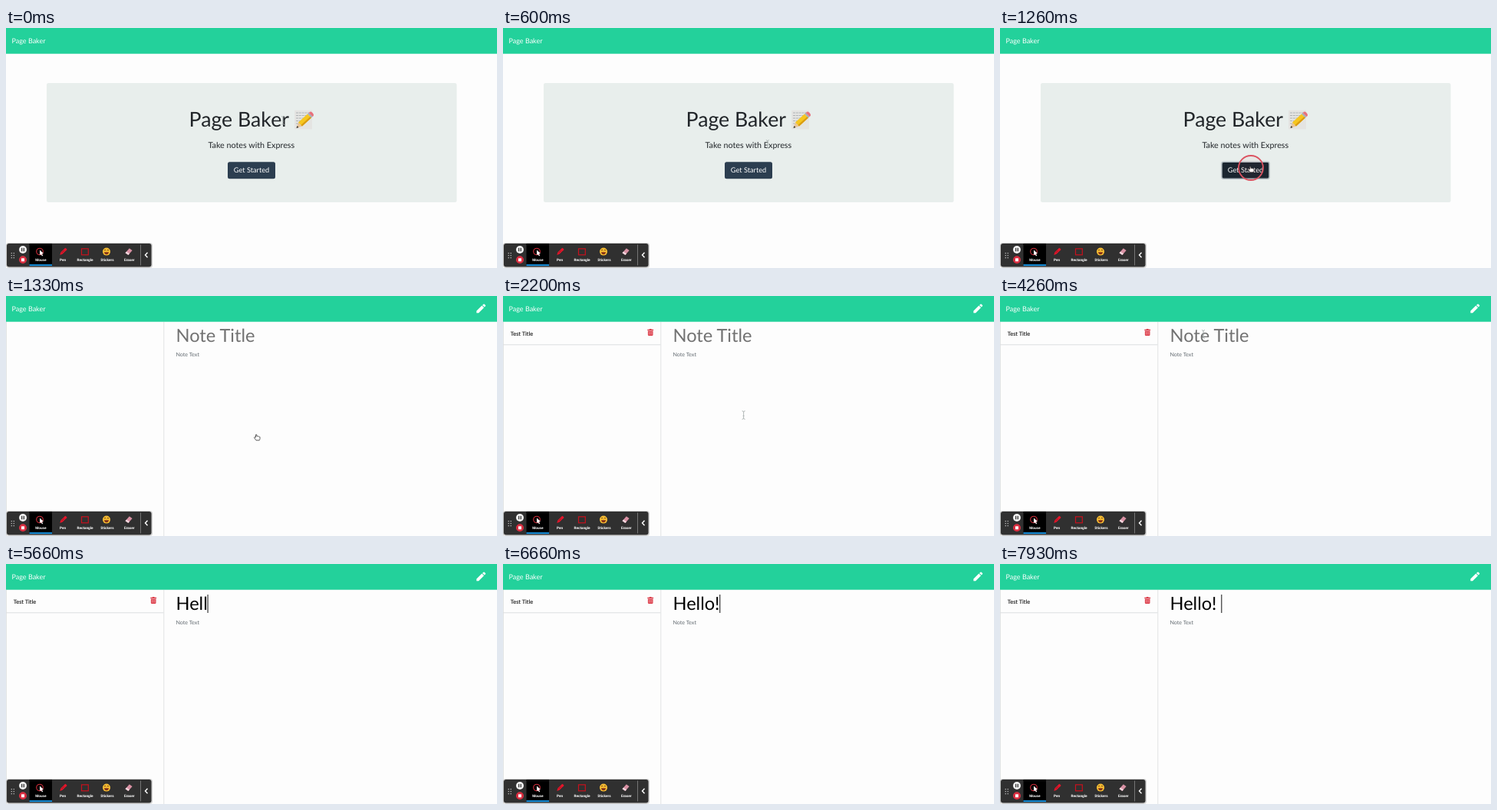
Recreate the animation shown at these times as an HTML page. Size 640x314 px, loop 8 s.

```html
<!DOCTYPE html>
<html lang="en">
<head>
<meta charset="utf-8">
<title>Note app</title>
<style>
html, body { margin: 0; width: 100%; height: 100%; overflow: hidden; background: #fdfdfd; }
svg { display: block; width: 640px; height: 314px; font-family: Lato, sans-serif; text-rendering: geometricPrecision; }
text { white-space: pre; }
.tool text { font: 700 4.7px Roboto, sans-serif; fill: #fff; text-anchor: middle; }
</style>
</head>
<body>
<svg viewBox="0 0 640 314">
  <rect width="640" height="314" fill="#fdfdfd"/>
  <rect width="640" height="33.7" fill="#23d19b"/>
  <text x="7.5" y="20" font-size="9" fill="#fff">Page Baker</text>

  <g id="home">
    <rect x="53" y="72" width="534.5" height="156" rx="2.5" fill="#e8eeec"/>
    <text x="238.6" y="129" font-size="26.7" fill="#212529">Page Baker</text>
    <g id="memo">
      <path d="M376 107.5h23v25h-23z" fill="#e4e4e2"/>
      <path d="M378 111h17m-17 3.5h14m-14 3.5h11m-11 3.5h8m-8 3.5h5" stroke="#a9adb0" stroke-width=".9" stroke-dasharray="3 .8"/>
      <path d="M378.5 131l2.5-7.5 5 5z" fill="#e9c59a"/>
      <path d="M378.5 131l1-3 2 2z" fill="#333"/>
      <path d="M381 123.5L393 112.500l5 5-12 11z" fill="#f6c61f"/>
      <path d="M384.500 127L396.500 116l1.500 1.500-12 11z" fill="#d99b12"/>
      <path d="M393 112.500l1.700-1.600 5 5-1.700 1.600z" fill="#a8b0b5"/>
      <path d="M394.700 110.900l1.300-1.200q1.600-.8 3.600 1.200t1.300 3.800l-1.200 1.200z" fill="#e8707c"/>
    </g>
    <text x="263.500" y="157" font-size="10.750" fill="#212529">Take notes with Express</text>
    <rect id="button" x="289" y="175.200" width="62" height="22" rx="2.500"/>
    <text x="320" y="189.200" font-size="9.200" fill="#fff" text-anchor="middle">Get Started</text>
  </g>

  <g id="notes">
    <path d="M.5 34V314M205.800 34V314" stroke="#dfe1e3" stroke-width=".9"/>
    <g id="item">
      <path d="M0 63.800H205.500" stroke="#dcdee0"/>
      <text x="9.800" y="51.600" font-size="7.400" fill="#111" stroke="#111" stroke-width=".1">Test Title</text>
      <path d="M188.300 43.700h2.200l.6-.8h2.200l.6.8h2.200v1.500h-7.800zM188.900 45.700h6.600v5q0 1.300-1.300 1.300h-4q-1.300 0-1.300-1.300z" fill="#dc3f4c"/>
      <path d="M190.500 46.700v4m1.700-4v4m1.700-4v4" stroke="#f6b5ba" stroke-width=".6"/>
    </g>
    <path d="M613.300 22.300v-2.700l7-7 2.700 2.700-7 7zM621 11.900l1.300-1.200q.7-.6 1.400 0l1.200 1.200q.7.7 0 1.400l-1.200 1.300z" fill="#fff"/>
    <text id="title" x="221.500" y="60.300" font-size="23.600"></text>
    <text x="221.500" y="79.300" font-size="7.150" fill="#626a70">Note Text</text>
    <rect id="caret" y="40" width="1" height="24" fill="#111"/>
  </g>

  <g id="pointer">
    <path id="beam" d="M-2-5.500q2 0 2 2V3.500q0 2-2 2M2-5.500q-2 0-2 2M2 5.500q-2 0-2-2M-1 1h2" fill="none" stroke="#a3aaa9" stroke-width=".8"/>
    <path id="hand" d="M-1.500 0V-3q0-.8.700-.8t.7.8V-1.500q1-.6 1.500.2 1-.5 1.400.4 1.200-.3 1.200.8v1.600q0 1.200-.8 2.300H-1L-3.300.6q-.4-1 .5-1z" fill="#fff" stroke="#333" stroke-width=".8"/>
  </g>
  <circle id="ring" fill="#e04050" fill-opacity=".04" stroke="#dc5260" stroke-width="1.800"/>

  <g class="tool">
    <rect x="0" y="281" width="191" height="33" rx="4" fill="#999" opacity=".45"/>
    <rect x="1" y="282" width="188.500" height="30.500" rx="3" fill="#303030"/>
    <rect x="30.500" y="282" width="29.500" height="29" fill="#000"/>
    <rect x="30.500" y="309.300" width="29.500" height="1.800" fill="#159cf2"/>
    <path d="M7.300 294v8M10.300 294v8" stroke="#bbb" stroke-width="1.300" stroke-dasharray="1.300 1.700"/>
    <circle cx="22" cy="290" r="5" fill="#f4f4f4"/>
    <path d="M20.700 287.800v4.400m2.600-4.400v4.400" stroke="#222" stroke-width="1.200"/>
    <circle cx="22" cy="303.300" r="5" fill="#d92e40"/>
    <rect x="20" y="301.300" width="4" height="4" fill="#fff"/>
    <circle cx="44" cy="292.500" r="4.300" fill="none" stroke="#d52e3c" stroke-width="1.100"/>
    <path d="M44 290.500l5 4.500-2.200.3 1.300 2.500-1.100.6-1.300-2.500-1.700 1.400z" fill="#fff"/>
    <path d="M70.300 297l1-3.500 4.800-4.800 2.300 2.300-4.800 4.800zM75.800 289l1-1q.7-.5 1.400.2l1 1q.5.700-.1 1.200l-1 1z" fill="#e5152a"/>
    <path d="M72.300 294.500l3.500-3.500" stroke="#7d1720" stroke-width=".7"/>
    <rect x="98.500" y="288.800" width="8.800" height="8" fill="none" stroke="#c9111d" stroke-width="1.200"/>
    <circle cx="131" cy="292.600" r="5" fill="#f8bd32"/>
    <path d="M128 291q1.200-1.500 2.200 0m1.600 0q1.200-1.500 2.200 0" fill="none" stroke="#633b12" stroke-width=".9"/>
    <path d="M128 293.300h6q-.4 3-3 3t-3-3z" fill="#823018"/>
    <path d="M155.500 294.300l5.300-6 3.800 2.800-5.200 6z" fill="#d991a4"/>
    <path d="M155.500 294.300l1.600-1.800 3.900 2.800-1.600 1.800z" fill="#f1d9df"/>
    <text x="45.300" y="304.700">Mouse</text>
    <text x="74" y="304.700">Pen</text>
    <text x="103" y="304.700">Rectangle</text>
    <text x="132" y="304.700">Stickers</text>
    <text x="160.800" y="304.700">Eraser</text>
    <path d="M175.500 283.500V310.500" stroke="#888" stroke-width=".8"/>
    <path d="M184.500 293.800l-3 3.200 3 3.200" fill="none" stroke="#fff" stroke-width="1.400"/>
  </g>
</svg>
<script>
const LOOP = 8000;
const el = id => document.getElementById(id);
const set = (id, attrs) => { for (const k in attrs) el(id).setAttribute(k, attrs[k]); };
const show = (id, on) => set(id, { visibility: on ? 'inherit' : 'hidden' });

// time, x, y
const path = [[0, 361, 121], [60, 361, 121], [260, 352, 139], [460, 352, 139], [860, 327, 185],
  [2060, 327, 185], [2530, 265, 50], [LOOP, 265, 50]];

// time, typed text, caret shown
const typing = [[0, '', 0], [2730, '', 1], [3260, '', 0], [3730, '', 1], [4260, '', 0],
  [4530, 'H', 1], [5130, 'H', 0], [5330, 'He', 1], [5460, 'Hel', 1], [5660, 'Hell', 1],
  [6200, 'Hello', 1], [6660, 'Hello!', 1], [6860, 'Hello! ', 1], [7400, 'Hello! ', 0], [7930, 'Hello! ', 1]];

function pointerAt(t) {
  const i = path.findIndex(p => p[0] > t);
  const [t0, x0, y0] = path[i - 1], [t1, x1, y1] = path[i];
  const u = (t - t0) / (t1 - t0), e = u * u * (3 - 2 * u);
  return [x0 + (x1 - x0) * e, y0 + (y1 - y0) * e];
}

function drawRing(t, x, y) {
  const [start, end] = t < 2000 ? [1060, 1330] : [2730, 2930];
  const u = (t - start) / (end - start);
  show('ring', u >= 0 && u < 1);
  set('ring', { cx: x, cy: y - 2, r: 16 * Math.min(1, Math.max(0, .5 + u)) });
}

function draw(t) {
  const home = t < 1330, [x, y] = pointerAt(t);
  show('home', home);
  show('notes', !home);
  show('item', !home && t >= 1460);

  const pressed = home && t >= 1060, hover = home && y > 175;
  set('button', {
    fill: hover ? '#1a252f' : '#2c3e50',
    stroke: pressed ? '#aeb8bd' : 'none', 'stroke-width': 1.5
  });

  const [, text, caret] = typing.findLast(s => s[0] <= t);
  el('title').textContent = text;
  const width = text ? el('title').getComputedTextLength() : 0;
  if (!text) el('title').textContent = 'Note Title';
  set('title', { fill: text ? '#000' : '#727272' });
  set('caret', { x: 221.3 + width });
  show('caret', !home && caret);

  const hand = hover || (!home && t < 1600);
  set('pointer', { transform: `translate(${x} ${y})` });
  show('hand', hand);
  show('beam', !hand && t < 4530);
  drawRing(t, x, y);
}

function frame() {
  draw(performance.now() % LOOP);
  requestAnimationFrame(frame);
}
frame();
</script>
</body>
</html>
```
